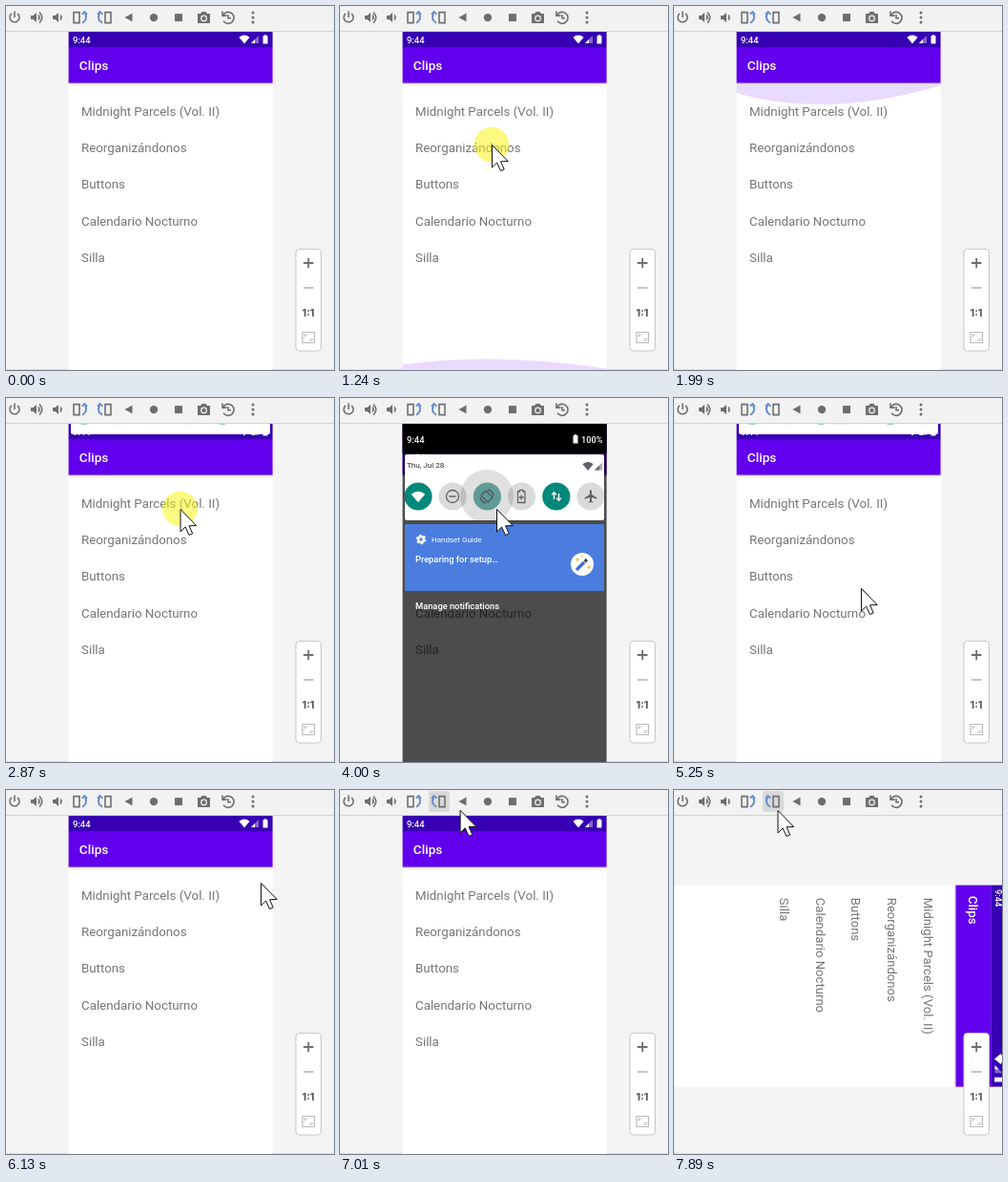
Write an HTML page that moves like this. It is 344x381 px and loops after 8000 ms.

```html
<!DOCTYPE html>
<html lang="en">
<head>
<meta charset="utf-8">
<title>Clip list</title>
<style>
html, body { margin: 0; width: 100%; height: 100%; overflow: hidden; background: #f4f4f4; }
svg { display: block; width: 100%; height: 100%; }
text { font-family: Roboto, "Noto Sans", sans-serif; }
.med { font-weight: 500; }
.ratio { font: 800 10.5px Inter, sans-serif; }
.line { fill: none; stroke: #6e6e6e; stroke-width: 1.6; }
.blue { fill: none; stroke: #5f88cf; stroke-width: 1.8; }
.tool { fill: #6e6e6e; }
.item { font-size: 13.3px; fill: #757575; }
.qs { fill: none; stroke: #5f6368; stroke-width: 1.3; }
</style>
</head>
<body>
<svg viewBox="0 0 344 381" preserveAspectRatio="none">
  <defs>
    <path id="wifi" d="M0 4.5L-5.6 -2.2Q0 -6.6 5.6 -2.2Z"/>
    <path id="signal" d="M-4 4L4 -4V4Z"/>
    <path id="battery" d="M-2.5 -3.7H-1.2V-4.7H1.2V-3.7H2.5V4.5H-2.5Z"/>
    <path id="speaker" d="M-5 -2H-2.5L1 -5V5L-2.5 2H-5Z"/>
    <path id="plane" d="M21 16v-2l-8-5V3.5c0-.83-.67-1.5-1.5-1.5S10 2.67 10 3.5V9l-8 5v2l8-2.5V19l-2 1.5V22l3.5-1 3.5 1v-1.5L13 19v-5.5l8 2.5z"/>
    <linearGradient id="shadow" x2="0" y2="1">
      <stop stop-color="#b5b5b5"/><stop offset="1" stop-color="#fff" stop-opacity="0"/>
    </linearGradient>
    <clipPath id="stageClip"><rect y="26.5" width="344" height="354.5"/></clipPath>
    <clipPath id="listClip"><rect x="65.6" y="80" width="214" height="301"/></clipPath>
    <clipPath id="panelClip"><rect x="68" y="59" width="209" height="69" rx="2"/></clipPath>
    <clipPath id="noteClip"><rect id="noteArea" x="68" y="132" width="209" height="70" rx="1.5"/></clipPath>
  </defs>

  <rect width="344" height="381" fill="#f4f4f4"/>
  <rect y="380" width="344" height="1" fill="#dedede"/>

  <g clip-path="url(#stageClip)">
    <g id="phone">
      <rect x="65.6" y="27" width="214" height="356" fill="#fff"/>
      <g id="items" class="item"></g>
      <g clip-path="url(#listClip)" fill="#6200ee" fill-opacity=".14">
        <path id="glowTop"/><path id="glowBottom"/>
      </g>
      <rect x="65.6" y="80" width="214" height="4" fill="url(#shadow)"/>
      <rect x="65.6" y="43" width="214" height="37.5" fill="#6200ee"/>
      <text class="med" x="76.8" y="66.7" font-size="13.6" fill="#fff">Clips</text>
      <rect x="65.6" y="26" width="214" height="17.2" fill="#3700b3"/>
      <g id="status" fill="#fff">
        <text class="med" x="70" y="38.5" font-size="9.4">9:44</text>
        <use href="#wifi" x="250" y="35"/>
        <use href="#signal" x="261" y="35" opacity=".4"/>
        <path d="M257 39L261 35V39Z"/>
        <use href="#battery" x="272" y="35"/>
      </g>
    </g>

    <g id="shade">
      <rect id="scrim" x="65.6" y="26" width="214" height="355"/>
      <g id="header">
        <rect x="65.6" y="26" width="214" height="32"/>
        <g fill="#fff" font-size="9.4">
          <text class="med" x="70" y="47">9:44</text>
          <use href="#battery" x="247" y="43"/>
          <text class="med" x="253" y="47" font-size="9.2">100%</text>
        </g>
      </g>
      <g clip-path="url(#noteClip)">
        <rect id="noteFill" x="68" y="131" width="209" height="72"/>
        <circle cx="85" cy="148" r="2.9" fill="none" stroke="#fff" stroke-width="2.4"/>
        <circle cx="85" cy="148" r="4.5" fill="none" stroke="#fff" stroke-width="1.5" stroke-dasharray="2.4 2.31"/>
        <text x="96" y="151" font-size="8" fill="#fff">Handset Guide</text>
        <text class="med" x="79" y="172.3" font-size="9.3" fill="#fff">Preparing for setup…</text>
        <circle cx="254" cy="174" r="12" fill="#fff"/>
        <path d="M248 180L256 172" stroke="#3c6fd6" stroke-width="3.2"/>
        <path d="M256.5 171.5L259 169" stroke="#4d4d4d" stroke-width="3.2"/>
        <path d="M249 167v4M247 169h4M261 175v4M259 177h4M254 165v2" stroke="#f3bd32" stroke-width="1.2"/>
      </g>
      <text id="manage" class="med" x="79" y="221.3" font-size="9.3" fill="#fff">Manage notifications</text>
      <g id="panel">
        <g clip-path="url(#panelClip)">
          <rect x="68" y="59" width="209" height="69" fill="#fff"/>
          <text x="70" y="73.3" font-size="8.1" fill="#333">Thu, Jul 28</text>
          <use href="#wifi" x="260" y="71.5" fill="#5f6368"/>
          <use href="#signal" x="271" y="71.5" fill="#aaa"/>
          <path d="M267 75.5L272 70.5V75.5Z" fill="#666"/>
          <g id="tiles"></g>
          <use href="#wifi" transform="translate(82 103.5) scale(1.3)" fill="#fff"/>
          <circle class="qs" cx="118" cy="103" r="6.5"/><path class="qs" d="M114.5 103h7"/>
          <g id="turnIcon" class="qs">
            <rect x="150.5" y="98" width="7" height="10" transform="rotate(-45 154 103)"/>
            <path d="M155 96q5 1 6 6M153 110q-5 -1 -6 -6"/>
          </g>
          <path class="qs" d="M186.5 98h2v-1.6h3.5v1.6h2v11.5h-7.5zM190.2 101.5v5M187.8 104h5"/>
          <path d="M224.5 106v-7M222.2 101.2l2.3-2.5 2.3 2.5M229.5 100v7M227.2 104.8l2.3 2.5 2.3-2.5" fill="none" stroke="#fff" stroke-width="1.4"/>
          <use href="#plane" transform="translate(255.3 95) scale(.667)" fill="#5f6368"/>
          <rect id="handle" x="165" y="115.5" width="16" height="2" fill="#dcdcdc"/>
          <circle id="ripple" cx="154" cy="103" fill="#000"/>
        </g>
      </g>
    </g>
  </g>

  <rect width="344" height="26" fill="#f2f2f2"/>
  <rect y="26" width="344" height="1" fill="#d3d3d3"/>
  <rect id="hover" x="93" y="1" width="22" height="22" rx="3" fill="#d9d9d9"/>
  <g transform="translate(0 -.4)">
    <path class="line" d="M6 8.2a5 5 0 1 0 6 0M9 6v6.5"/>
    <use href="#speaker" x="31" y="12.5" class="tool"/>
    <path class="line" d="M34 10q2 2.5 0 5M35 7q5.5 5.5 0 11"/>
    <use href="#speaker" x="54" y="12.5" class="tool"/>
    <path class="line" d="M57 10q2 2.5 0 5"/>
    <path class="line" d="M71 7h6v11h-6z"/>
    <path class="blue" d="M80 18q6 -3 3 -10M79.5 9l3-2.5 2.5 3"/>
    <path class="line" d="M104 7h6v11h-6z"/>
    <path class="blue" d="M101 18q-6 -3 -3 -10M101.5 9l-3-2.5-2.5 3"/>
    <path class="tool" d="M124.5 12.5l8-4.5v9z"/>
    <circle class="tool" cx="155" cy="12.5" r="4.2"/>
    <rect class="tool" x="177" y="8.5" width="8" height="8"/>
    <path class="tool" d="M201 8.5h3l1.5-2h4l1.5 2h3v10h-13z"/>
    <circle cx="207.5" cy="13.3" r="2.8" fill="#6e6e6e" stroke="#f2f2f2" stroke-width="1.2"/>
    <path class="line" d="M228 9.5a6 6 0 1 1 0 6.5M227 6v4.5h4.5M233 9.5v3.5h3"/>
    <g class="tool"><circle cx="259" cy="7.5" r="1.5"/><circle cx="259" cy="12.5" r="1.5"/><circle cx="259" cy="17.5" r="1.5"/></g>
  </g>

  <rect x="304" y="254.5" width="26.5" height="106.5" rx="3.5" fill="#fff" stroke="#c6c6c6"/>
  <path d="M312 269h10.5M317.2 263.7v10.6" stroke="#6e6e6e" stroke-width="1.8"/>
  <path d="M312 295h10.5" stroke="#bdbdbd" stroke-width="1.8"/>
  <text class="ratio" x="317" y="324.8" text-anchor="middle" fill="#5f5f5f">1:1</text>
  <path d="M311 341.5h12.5v11h-12.5zM313.5 346.5v-2.5h3M321 347.5v2.5h-3" fill="none" stroke="#b9b9b9" stroke-width="1.2"/>

  <g id="cursor">
    <circle id="halo" r="18.3" fill="#faf51e" fill-opacity=".56"/>
    <path d="M.5 .5V24L5.6 19L9.5 27.5L13.2 25.9L9.5 17.8L17.2 17.5Z" fill="#fff" stroke="#111"/>
  </g>
</svg>
<script>
const LOOP = 8000, STEP = 125;
const $ = id => document.getElementById(id);
const set = (id, attrs) => { for (const k in attrs) $(id).setAttribute(k, attrs[k]); };
const show = (id, on) => set(id, { visibility: on ? 'visible' : 'hidden' });
const clamp = v => Math.max(0, Math.min(1, v));
const within = (t, a, b) => t >= a && t < b;
const mix = (a, b, p) => `rgb(${a.map((v, i) => Math.round(v + (b[i] - v) * p))})`;

// Linear interpolation through [time, ...values] keys
function track(keys, t) {
  const i = keys.findIndex(k => k[0] > t);
  if (i < 0) return keys[keys.length - 1].slice(1);
  if (i === 0) return keys[0].slice(1);
  const a = keys[i - 1], b = keys[i], p = (t - a[0]) / (b[0] - a[0]);
  return a.slice(1).map((v, j) => v + (b[j + 1] - v) * p);
}

const TEAL = [0, 137, 123], GREY = [218, 218, 218];
const PEEK = 38; // lower edge of the panel while it only covers the status bar
const POINTER = [
  [500, 284, 289], [1000, 158, 200], [1125, 158, 200], [1375, 160, 90], [1500, 160, 120], [1875, 158, 285],
  [2250, 176, 140], [2500, 182, 32], [2625, 182, 40], [2750, 183, 77], [2875, 182.5, 116],
  [3375, 180, 250], [3750, 164, 116], [4125, 164, 116], [4500, 183, 296], [4625, 183, 296],
  [5000, 186.5, 212], [5125, 196, 199], [5625, 196, 199], [6125, 267, 97], [6375, 219, 53],
  [6500, 212, 48], [7125, 104, 14], [7750, 104, 14], [7875, 108.5, 21]
];
const SHADE = [
  [2500, 0], [2750, PEEK], [2875, PEEK], [3375, 240],
  [4750, 240], [4875, 215], [5000, 183], [5125, 110], [5250, PEEK], [5375, 0]
];
const TOP_GLOW = [[1500, 0], [2000, 20], [2125, 14], [2500, 0]];
const BOTTOM_GLOW = [[1125, 0], [1375, 20], [1750, 0]];

$('items').innerHTML = ['Midnight Parcels (Vol. II)', 'Reorganizándonos', 'Buttons', 'Calendario Nocturno', 'Silla']
  .map((s, i) => `<text x="79" y="${114.7 + i * 38.3}">${s}</text>`).join('');
$('tiles').innerHTML = [TEAL, GREY, GREY, GREY, TEAL, GREY]
  .map((c, i) => `<circle id="tile${i}" cx="${82 + i * 36.2}" cy="103" r="14.6" fill="rgb(${c})"/>`).join('');

// Overscroll arc leaning left; dir is 1 downwards, -1 upwards
function glow(id, edge, depth, dir) {
  const at = k => edge + dir * depth * k;
  set(id, { d: depth > 0 ? `M65 ${edge}V${at(.55)}Q160 ${at(1.95)} 280 ${at(.15)}V${edge}Z` : '' });
}

function drawShade(t) {
  const [bottom] = track(SHADE, t);
  const cover = clamp((bottom - 60) / 68);
  show('shade', bottom > 0);
  set('scrim', { opacity: .7 * clamp((bottom - PEEK) / 148) });
  set('header', { opacity: cover });
  set('status', { opacity: 1 - cover });
  set('panel', { transform: `translate(0 ${Math.min(0, bottom - 128)})` });
  set('noteArea', { height: Math.max(0, Math.min(70, bottom - 132)) });
  set('noteFill', { fill: mix([74, 125, 222], [123, 161, 238], clamp((235 - bottom) / 50)) });
  set('manage', { opacity: clamp((bottom - 190) / 45) });

  const on = track([[3875, 0], [4000, .5], [4250, 1]], t)[0];
  set('tile2', { fill: mix(GREY, TEAL, on) });
  set('turnIcon', { style: `stroke:${mix([95, 99, 104], [255, 255, 255], clamp(on * 2 - 1))}` });
  const [r, alpha] = track([[3750, 0, .12], [3875, 18, .12], [4000, 28, .12], [4250, 28, .1], [4500, 28, 0]], t);
  set('ripple', { r, opacity: alpha });
  show('handle', bottom > 0 && t >= 4500);
}

function draw(now) {
  const t = Math.floor((now % LOOP + 10) / STEP) * STEP % LOOP;
  set('phone', { transform: t >= 7375 ? 'matrix(0 .986 -.986 0 375 34.92)' : '' });
  glow('glowTop', 80, track(TOP_GLOW, t)[0], 1);
  glow('glowBottom', 381, track(BOTTOM_GLOW, t)[0], -1);
  drawShade(t);
  show('hover', t >= 6875);

  const [x, y] = track(POINTER, t);
  const visible = within(t, 500, 1875) || t >= 2250;
  const pressed = within(t, 1125, 1875) || within(t, 2500, 3375) || within(t, 4625, 5250);
  set('cursor', { transform: `translate(${x} ${y})` });
  show('cursor', visible);
  show('halo', visible && pressed);
}

function tick() {
  draw(performance.now());
  requestAnimationFrame(tick);
}
tick();
</script>
</body>
</html>
```
